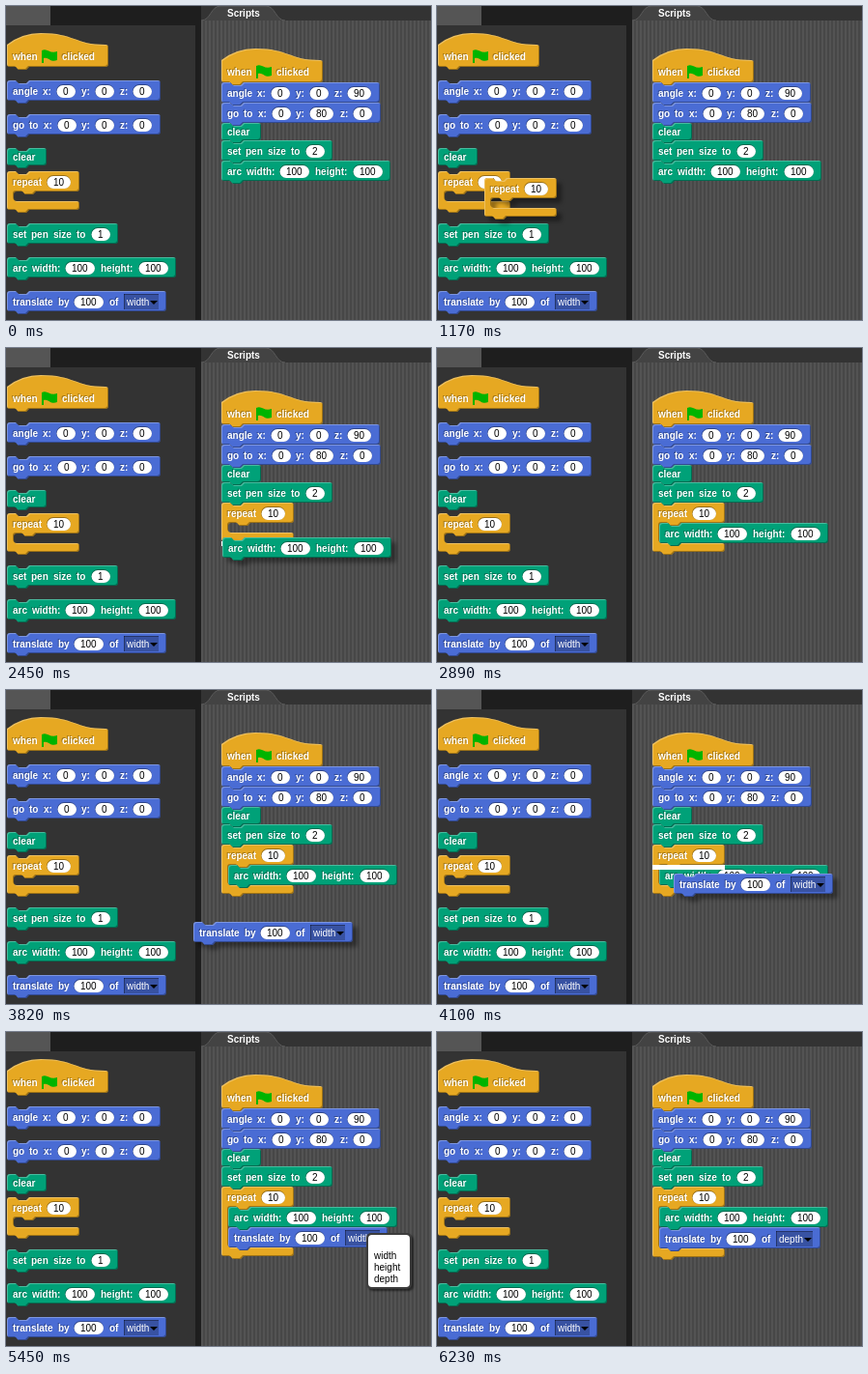
Write an HTML page with a canvas that moves like this. It is 440x325 px and loops after 6810 ms.

```html
<!DOCTYPE html>
<html lang="en">
<head>
<meta charset="utf-8">
<title>Block scripting</title>
<style>
  html, body { margin: 0; width: 100%; height: 100%; overflow: hidden; background: #1e1e1e; }
  canvas { display: block; width: 440px; height: 325px; }
</style>
</head>
<body>
<canvas id="stage" width="440" height="325"></canvas>
<script>
const ctx = document.getElementById('stage').getContext('2d');
const LOOP = 6810;
const FONT = '10px "Liberation Sans", Arial, sans-serif';
const YELLOW = 'rgb(230,168,34)', BLUE = 'rgb(74,108,212)', GREEN = 'rgb(0,161,120)';

function textWidth(str, bold) {
  ctx.font = (bold ? 'bold ' : '') + FONT;
  return ctx.measureText(str).width;
}

const pill = n => ({ kind: 'pill', text: String(n), w: textWidth(n) + 15.3 });
const menu = text => ({ kind: 'menu', text, w: textWidth(text) + 13 });
const flag = { kind: 'flag', w: 15.5 };
const words = str => str.split(' ').map(text => ({ kind: 'word', text, w: textWidth(text, true) }));

// Lays out words and inputs from left to right; strings become bold words
function block(color, items, extra) {
  let x = 6;
  const parts = items.flatMap(i => typeof i === 'string' ? words(i) : i).map(part => {
    const placed = { ...part, x };
    x += part.w + 5;
    return placed;
  });
  const { minWidth = 41, ...rest } = extra || {};
  return { color, parts, w: Math.max(minWidth, Math.round(x + 2.7)), h: 21, mid: 11, ...rest };
}

const hat = block(YELLOW, ['when', flag, 'clicked'], { h: 35, mid: 24, hat: true, minWidth: 105 });
const angle = z => block(BLUE, ['angle x:', pill(0), 'y:', pill(0), 'z:', pill(z)]);
const goTo = y => block(BLUE, ['go to x:', pill(0), 'y:', pill(y), 'z:', pill(0)]);
const clear = block(GREEN, ['clear'], { h: 18, mid: 9 });
const repeat = inner => block(YELLOW, ['repeat', pill(10)], { h: 30 + inner, inner });
const penSize = n => block(GREEN, ['set pen size to', pill(n)]);
const arc = block(GREEN, ['arc width:', pill(100), 'height:', pill(100)]);
const translate = (choice, extra) => block(BLUE, ['translate by', pill(100), 'of', menu(choice)], extra);
const byWidth = translate('width');
const byDepth = translate('depth', { h: 22, mid: 12 });

function outline({ w, h, hat, inner }) {
  const p = new Path2D();
  const corner = (cx, cy, x, y) => p.quadraticCurveTo(cx, cy, x, y);
  const lines = (...pts) => pts.forEach(([x, y]) => p.lineTo(x, y));
  const top = hat ? 12 : 0;
  if (hat) {
    const span = 70, r = (4 * top * top + span * span) / (8 * top);
    const half = 2 * Math.atan(2 * top / span);
    p.arc(span / 2, r, r, -half - Math.PI / 2, -Math.PI / 2);
    p.bezierCurveTo(span, 0, span, top, w - 3, top);
  } else {
    p.moveTo(0, 3);
    corner(0, 0, 3, 0);
    lines([9, 0], [12, 3], [20, 3], [23, 0]);
  }
  p.lineTo(w - 3, top);
  corner(w, top, w, top + 3);
  if (inner) {
    const low = 21 + inner;
    p.lineTo(w, 18);
    corner(w, 21, w - 3, 21);
    lines([30, 21], [27, 24], [19, 24], [16, 21], [10, 21]);
    corner(7, 21, 7, 24);
    p.lineTo(7, low - 3);
    corner(7, low, 10, low);
    p.lineTo(w - 3, low);
    corner(w, low, w, low + 3);
  }
  p.lineTo(w, h - 3);
  corner(w, h, w - 3, h);
  lines([23, h], [20, h + 3], [12, h + 3], [9, h], [3, h]);
  corner(0, h, 0, h - 3);
  p.closePath();
  return p;
}

// Leaves only the rim lying outside the shape moved by d
function rim(path, d, color) {
  const p = new Path2D();
  p.rect(-10, -10, 240, 120);
  p.addPath(path, new DOMMatrix([1, 0, 0, 1, d, d]));
  ctx.fillStyle = color;
  ctx.fill(p, 'evenodd');
}

function text(str, x, y, color, bold) {
  ctx.font = (bold ? 'bold ' : '') + FONT;
  ctx.fillStyle = color;
  ctx.fillText(str, Math.round(x), y);
}

function roundBox(x, y, w, h, r, color) {
  ctx.fillStyle = color;
  ctx.beginPath();
  ctx.roundRect(x, y, w, h, r);
  ctx.fill();
}

const drawPart = {
  word({ x, text: str }, mid) {
    text(str, x - 1, mid + 3, 'rgba(0,0,0,.3)', true);
    text(str, x, mid + 4, '#fff', true);
  },
  pill({ x, w, text: str }, mid) {
    const left = Math.round(x), width = Math.round(w - 1);
    roundBox(left, mid - 7, width, 14, 7, 'rgba(0,0,0,.35)');
    roundBox(left + .5, mid - 6, width - .5, 13, 6.5, '#fff');
    text(str, x + 7, mid + 4, '#000');
  },
  menu({ x, w, text: str }, mid) {
    const left = Math.round(x), width = Math.round(w), tip = left + width - 5;
    ctx.fillStyle = 'rgb(56,82,162)';
    ctx.fillRect(left, mid - 8, width, 16);
    ctx.fillStyle = 'rgba(0,0,0,.35)';
    ctx.fillRect(left, mid - 8, width, 1);
    ctx.fillRect(left, mid - 8, 1, 16);
    text(str, left + 3, mid + 4, '#fff');
    ctx.fillStyle = '#000';
    ctx.beginPath();
    ctx.moveTo(tip - 4, mid - 1);
    ctx.lineTo(tip + 4, mid - 1);
    ctx.lineTo(tip, mid + 3);
    ctx.fill();
  },
  flag({ x }, mid) {
    const left = Math.round(x) - 1;
    ctx.fillStyle = 'rgb(0,180,0)';
    ctx.beginPath();
    ctx.moveTo(left, mid - 6);
    ctx.bezierCurveTo(left + 6, mid - 9, left + 8, mid - 2, left + 16, mid - 5);
    ctx.lineTo(left + 16, mid + 4);
    ctx.bezierCurveTo(left + 9, mid + 7, left + 7, mid, left + 2, mid + 2);
    ctx.lineTo(left + 2, mid + 7);
    ctx.lineTo(left, mid + 7);
    ctx.fill();
  }
};

function draw(b, x, y, lifted) {
  const path = b.path || (b.path = outline(b));
  ctx.save();
  ctx.translate(Math.round(x), Math.round(y));
  ctx.save();
  if (lifted) {
    ctx.shadowColor = 'rgba(0,0,0,.38)';
    ctx.shadowOffsetX = ctx.shadowOffsetY = 5;
    ctx.shadowBlur = 4;
  }
  ctx.fillStyle = b.color;
  ctx.fill(path);
  ctx.restore();
  ctx.save();
  ctx.clip(path);
  rim(path, 1, 'rgba(255,255,255,.28)');
  rim(path, -1, 'rgba(0,0,0,.32)');
  ctx.restore();
  b.parts.forEach(p => drawPart[p.kind](p, b.mid));
  ctx.restore();
}

const palette = [[hat, 28], [angle(0), 77], [goTo(0), 112], [clear, 147],
  [repeat(10), 171], [penSize(1), 225], [arc, 260], [byWidth, 295]];
const fixedScript = [hat, angle(90), goTo(80), clear, penSize(2)];
const loops = { empty: repeat(10), one: repeat(21), two: repeat(42), tall: repeat(43) };

// Drags: path knots are [step, x, y]; targets are drop lines [x, y, width, line x]
const drags = [
  { from: 1090, to: 1750, step: 49, block: loops.empty,
    path: [[0, 16, 173], [2, 82, 183], [4, 160, 190], [6, 212, 190], [8, 225, 180], [10, 223, 167]],
    targets: [[223, 160, 115, 223], [223, 181, 175, 223]] },
  { from: 2450, to: 2890, step: 40, block: arc,
    path: [[0, 224, 196], [3, 226, 190], [6, 227, 186]],
    targets: [[230, 181, 75, 223], [223, 200, 75, 223]] },
  { from: 3660, to: 4480, step: 40, block: byWidth,
    path: [[0, 12, 290], [2, 100, 267], [4, 194, 240], [6, 240, 215], [8, 254, 199], [11, 245, 190], [13, 235, 199]],
    targets: [[230, 181, 75, 223], [230, 202, 175, 230], [223, 211, 75, 223]] }
];

function along(path, s) {
  const i = path.findIndex(k => k[0] >= s);
  if (i < 0) return path[path.length - 1].slice(1);
  if (i === 0) return path[0].slice(1);
  const [s0, x0, y0] = path[i - 1], [s1, x1, y1] = path[i];
  const u = (s - s0) / (s1 - s0);
  return [x0 + (x1 - x0) * u, y0 + (y1 - y0) * u];
}

function drawDrag({ from, step, block, path, targets }, t) {
  const [x, y] = along(path, Math.floor((t - from) / step + 1e-6));
  const distance = ([tx, ty]) => Math.hypot(tx - x, ty - y);
  const near = targets.reduce((a, b) => distance(b) < distance(a) ? b : a);
  if (distance(near) < 22) {
    ctx.fillStyle = '#fff';
    ctx.fillRect(near[3], near[1], near[2], 5);
  }
  draw(block, x, y, true);
}

function drawBackdrop() {
  ctx.fillStyle = '#1e1e1e';
  ctx.fillRect(0, 0, 440, 325);
  ctx.fillStyle = '#555';
  ctx.fillRect(0, 0, 46, 20);
  ctx.fillStyle = '#333';
  ctx.fillRect(0, 20, 196, 305);
  ctx.fillRect(202, 0, 238, 15);
  ctx.fillStyle = '#474747';
  ctx.fillRect(202, 15, 238, 310);
  ctx.fillStyle = '#535353';
  for (let x = 202; x < 440; x += 4) ctx.fillRect(x, 15, 2, 310);
  ctx.beginPath();
  ctx.moveTo(202, 15);
  ctx.bezierCurveTo(212, 15, 212, 0, 222, 0);
  ctx.lineTo(269, 0);
  ctx.bezierCurveTo(279, 0, 279, 15, 289, 15);
  ctx.fillStyle = '#434343';
  ctx.fill();
  ctx.strokeStyle = '#5a5a5a';
  ctx.lineWidth = 1;
  ctx.stroke();
  text('Scripts', 229, 11, '#fff', true);
}

function drawScript(t) {
  let y = 44;
  for (const b of fixedScript) {
    draw(b, 223, y);
    y += b.h;
  }
  if (t < 1750) return draw(arc, 223, y);
  if (t < 2890) {
    draw(loops.empty, 223, y);
    if (t < 2450) draw(arc, 223, y + loops.empty.h);
    return;
  }
  draw(t < 4480 ? loops.one : t < 6230 ? loops.two : loops.tall, 223, y);
  draw(arc, 230, y + 21);
  if (t >= 4480) draw(t < 6230 ? byWidth : byDepth, 230, y + 42);
}

function drawMenu(t) {
  ctx.save();
  ctx.shadowColor = 'rgba(0,0,0,.5)';
  ctx.shadowOffsetX = ctx.shadowOffsetY = 2;
  ctx.shadowBlur = 2;
  roundBox(373, 208, 47, 58, 5, '#3c3c3c');
  ctx.restore();
  roundBox(375, 210, 43, 54, 4, '#fff');
  const active = [5640, 5680, 5840, 5880].filter(at => t >= at).length - 1;
  if (active >= 0) {
    ctx.fillStyle = t < 6150 ? '#c0c0c0' : '#808080';
    ctx.fillRect(377, 213 + active * 12, active < 2 ? 34 : 38, 12);
  }
  ['width', 'height', 'depth'].forEach((s, i) => text(s, 381, 235 + i * 12, '#000'));
}

function render(t) {
  drawBackdrop();
  palette.forEach(([b, y]) => draw(b, 1, y));
  drawScript(t);
  const drag = drags.find(d => t >= d.from && t < d.to);
  if (drag) drawDrag(drag, t);
  if (t >= 5450 && t < 6230) drawMenu(t);
}

const start = performance.now();
function tick() {
  render((performance.now() - start) % LOOP);
  requestAnimationFrame(tick);
}
tick();
</script>
</body>
</html>
```
